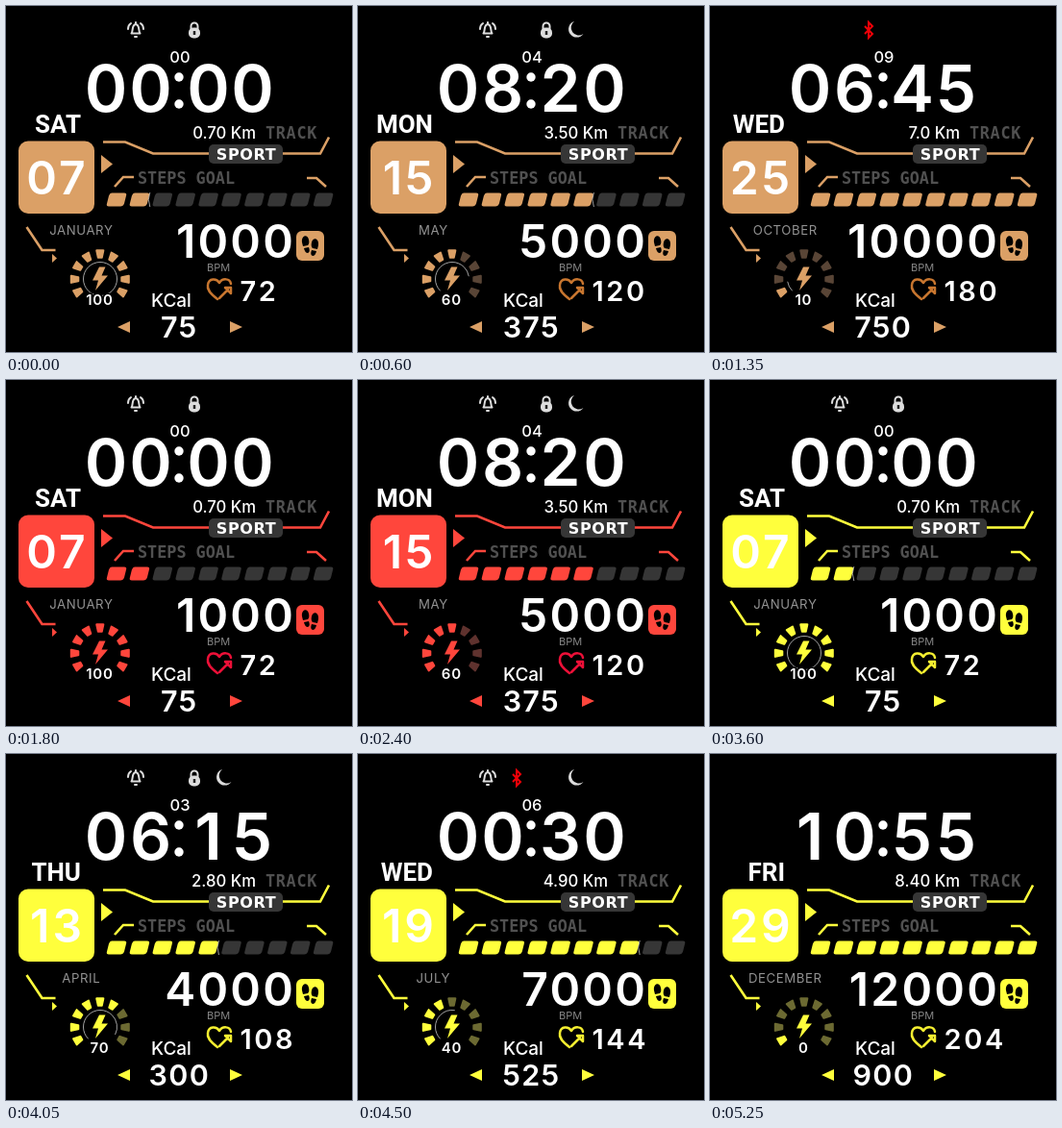
An HTML page that plays this animation: 360x360 px, repeating every 5.4 s.

```html
<!DOCTYPE html>
<html lang="en">
<head>
<meta charset="utf-8">
<title>Watch face</title>
<style>
  html, body { margin: 0; width: 100%; height: 100%; overflow: hidden; background: #000; }
  svg { display: block; width: 100vw; height: 100vh; --main: #dba066; --dim: #594536; --heart: #c8762f; }
  text { font-family: Inter, Lato, sans-serif; font-weight: 600; fill: #fff; }
  .mid { text-anchor: middle; }
  .end { text-anchor: end; }
  .main { fill: var(--main); }
  .line { fill: none; stroke: var(--main); stroke-width: 2.6; }
  .heart { fill: none; stroke: var(--heart); stroke-width: 2.5; stroke-linecap: round; stroke-linejoin: round; }
  .time { font-size: 67.5px; }
  .tech { font: 700 16.8px "DejaVu Sans Mono", monospace; fill: #505050; }
  .track { letter-spacing: .7px; }
  .weekday { font: 700 26px Roboto, sans-serif; }
  .day { font-size: 48px; letter-spacing: 3px; }
  .distance { font-size: 16.7px; font-weight: 500; }
  .month { font-size: 13.2px; font-weight: 400; letter-spacing: .6px; fill: #929292; }
  .steps { font-size: 48px; letter-spacing: 2.2px; }
  .battery { font-size: 15px; letter-spacing: .8px; stroke: #000; stroke-width: 3; paint-order: stroke; }
  .bpm { font-size: 11px; font-weight: 400; fill: #858585; }
  .pulse { font-size: 29px; letter-spacing: 2.6px; }
  .kcal { font-size: 19px; font-weight: 500; }
  .calories { font-size: 30.5px; letter-spacing: 1.3px; }
  .sport { font: 700 16px "DejaVu Sans", sans-serif; letter-spacing: .6px; }
  .glint { fill: none; stroke: #fff; stroke-width: .6; }
</style>
</head>
<body>
<svg viewBox="0 0 360 360">
  <rect width="360" height="360"/>

  <g id="bell" fill="none" stroke="#ddd" stroke-width="2" stroke-linecap="round" stroke-linejoin="round">
    <path d="M130.500 28.500c2-2 0-9 4.500-9.500 4.500.500 2.500 7.500 4.500 9.500zM135 17v1M134 32h2M127 24q0-4 3-6M143 24q0-4-3-6"/>
  </g>
  <path id="bluetooth" d="M161 21l8 8-4 4V17l4 4-8 8" fill="none" stroke="#f00008" stroke-width="2"/>
  <g id="lock">
    <path d="M192.500 24v-3a3.500 3.500 0 0 1 7 0v3" fill="none" stroke="#ddd" stroke-width="2"/>
    <rect x="190" y="22.500" width="12" height="11" rx="5" fill="#ddd"/>
    <path d="M196 26v4" stroke="#222" stroke-width="2.500"/>
  </g>
  <path id="moon" d="M225 16a8.500 8.500 0 1 0 9.500 13a8 8 0 0 1-9.500-13z" fill="#ddd"/>

  <text id="seconds" class="mid" x="181" y="59" font-size="16.500" style="font-weight:500"/>
  <g class="mid">
    <text id="h1" class="time" x="104" y="110"/>
    <text id="h2" class="time" x="150.500" y="110"/>
    <text id="m1" class="time" x="210.500" y="110"/>
    <text id="m2" class="time" x="256.500" y="110"/>
  </g>
  <circle cx="180" cy="74" r="4.700" fill="#fff"/>
  <circle cx="180" cy="102" r="4.700" fill="#fff"/>

  <text id="weekday" class="weekday end" x="78" y="131.500"/>
  <rect class="main" x="13" y="140.500" width="79" height="75.500" rx="10"/>
  <text id="day" class="day mid" x="53.500" y="195.500"/>
  <path class="main" d="M99 155l12 9.500-12 9.500z"/>

  <text id="distance" class="distance end" x="260" y="138"/>
  <text class="tech track" x="270" y="138">TRACK</text>
  <path class="line" d="M101 141.500h23l29 12h60M287 153.500h40l9-17"/>
  <rect x="211" y="144" width="77" height="20" rx="5" fill="#363636"/>
  <text class="sport mid" x="250" y="160">SPORT</text>

  <path class="line" d="M113 188l9-10h11M313 179h10l10 9"/>
  <text class="tech" x="137" y="185">STEPS GOAL</text>
  <g id="bar"></g>
  <path id="barEdge" class="glint" d="M2 194q-3 7 0 15"/>

  <path class="line" d="M21.500 230l16 24h14"/>
  <path class="main" d="M48 258l5 4.500-5 4.500z"/>
  <text id="month" class="month mid" x="78.300" y="238"/>

  <text id="steps" class="steps end" x="301" y="262"/>
  <rect class="main" x="302" y="234" width="29" height="31" rx="6"/>
  <path id="sole" d="M308 246c-1-8 6-9 7-3q1 4-1 6l-5 1zM310 252l5-1q2 5-1 6-3 0-4-5z"/>
  <use href="#sole" transform="matrix(-1 0 0 1 633 3)"/>

  <g id="dial"></g>
  <circle id="dialEdge" class="glint" cx="98" cy="284" r="17.500" pathLength="100" transform="rotate(135 98 284)"/>
  <path class="main" d="M97 271.500h6.500l-4 9h6.500l-13 15.500 3-10.500h-6z"/>
  <text id="battery" class="battery mid" x="97.400" y="311"/>

  <text class="bpm" x="209" y="276">BPM</text>
  <path class="heart" d="M220 305c-8-6-11-10-10-15 1-7 9-7 12-2 3-5 11-5 12 1M222 304l9-9M228 293h6v6z"/>
  <text id="pulse" class="pulse" x="243.500" y="306.500"/>

  <text class="kcal" x="151" y="313">KCal</text>
  <text id="calories" class="calories mid" x="180.300" y="345"/>
  <path class="main" d="M116 334l13-6v12zM246 334l-13-6v12z"/>
</svg>
<script>
  const STEP = 150, STATES = 12, PITCH = 23.9;
  const DAYS = ["SUN", "MON", "TUE", "WED", "THU", "FRI", "SAT"];
  const MONTHS = ["JANUARY", "FEBRUARY", "MARCH", "APRIL", "MAY", "JUNE", "JULY",
    "AUGUST", "SEPTEMBER", "OCTOBER", "NOVEMBER", "DECEMBER"];
  const THEMES = [
    { main: "#dba066", dim: "#594536", heart: "#c8762f" },
    { main: "#ff463c", dim: "#5f322e", heart: "#ed1038" },
    { main: "#ffff3c", dim: "#6c6a32", heart: "#f4ee30" }
  ];

  const $ = id => document.getElementById(id);
  const setText = (id, value) => { $(id).textContent = value; };
  const show = (id, on) => { $(id).style.display = on ? "" : "none"; };
  const pad = n => String(n).padStart(2, "0");

  function addPath(parent, d, transform) {
    const path = document.createElementNS("http://www.w3.org/2000/svg", "path");
    path.setAttribute("d", d);
    path.setAttribute("transform", transform);
    $(parent).append(path);
    return path;
  }

  const blocks = Array.from({ length: 10 }, (_, i) =>
    addPath("bar", "M6 194.500h13q3 0 2 3l-2 8q-1 3-4 3h-12q-3 0-2-3l2-8q1-3 3-3z",
      `translate(${104 + PITCH * i})`));
  const ticks = Array.from({ length: 9 }, (_, i) =>
    addPath("dial", "M-3.500-31h7q1.500 0 1 1.500l-1.500 7q0 1-1 1h-4q-1 0-1-1l-1.500-7q-.500-1.500 1-1.500z",
      `translate(97.800 284.300) rotate(${30 * i - 120})`));

  const fill = (parts, lit, rest) => parts.forEach((part, i) => {
    part.style.fill = i < lit ? "var(--main)" : rest;
  });

  function draw(index) {
    const k = index % STATES, num = k + 1;
    const themeIndex = Math.floor(index / STATES);
    for (const [name, color] of Object.entries(THEMES[themeIndex]))
      document.querySelector("svg").style.setProperty("--" + name, color);

    const [h1, h2] = pad(2 * k % 12), [m1, m2] = pad(5 * k);
    Object.entries({ h1, h2, m1, m2 }).forEach(([id, digit]) => setText(id, digit));
    setText("seconds", pad(k));
    show("seconds", num < 12);

    show("bell", num < 8);
    show("bluetooth", num > 5 && num < 12);
    show("lock", num < 7);
    show("moon", num > 2 && num < 9);

    const day = 2 * k + 7;
    setText("day", pad(day));
    setText("weekday", DAYS[new Date(2023, k, day).getDay()]);
    setText("month", MONTHS[k]);

    const km = num * 0.7;
    setText("distance", km.toFixed(num === 10 ? 1 : 2) + " Km");
    setText("steps", num * 1000);
    setText("pulse", 60 + num * 12);
    setText("calories", num * 75);

    const battery = Math.max(0, 100 - 10 * k);
    setText("battery", battery);
    fill(ticks, Math.max(1, Math.round(battery * 0.09)), "var(--dim)");
    const lit = Math.min(10, num + 1);
    fill(blocks, lit, "#363636");

    // thin highlights at the ends of both gauges
    const glint = themeIndex !== 1;
    show("barEdge", glint && lit < 10);
    show("dialEdge", glint && battery > 0);
    $("barEdge").setAttribute("transform", `translate(${100 + PITCH * lit})`);
    $("dialEdge").setAttribute("stroke-dasharray", `${battery} 100`);
  }

  let last = -1;
  function tick() {
    const index = Math.floor(performance.now() / STEP) % (STATES * THEMES.length);
    if (index !== last) draw(last = index);
    requestAnimationFrame(tick);
  }
  tick();
</script>
</body>
</html>
```
